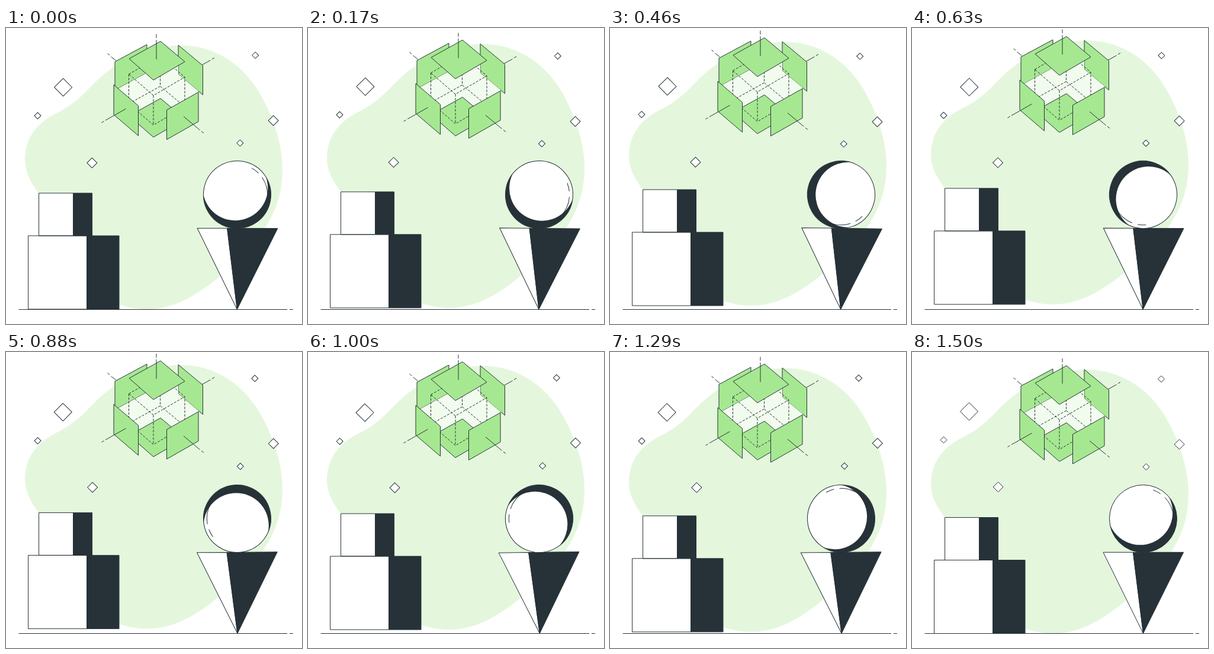
These frames come from a looping animation (500 by 500 pixels, 1540 ms). An HTML page:

```html
<!DOCTYPE html>
<html lang="en">
<head>
<meta charset="utf-8">
<title>Floating shapes</title>
<style>
  html, body { margin: 0; width: 100%; height: 100%; overflow: hidden; background: #fff; }
  svg { display: block; width: 100vw; height: 100vh; }
  .ink { stroke: #263238; stroke-width: 1; stroke-linejoin: round; }
  .dark { fill: #263238; }
  .white { fill: #fff; }
  .panel { fill: #a6e891; }
  .line { fill: none; }
  .dash { fill: none; stroke-dasharray: 4 2.3; }
</style>
</head>
<body>
<svg viewBox="0 0 500 500">
  <defs>
    <clipPath id="round"><circle cx="390.5" cy="281.5" r="57"/></clipPath>
  </defs>

  <path class="float" fill="#e4f7dd" d="M32 223C32 185 54 160 84 145C114 130 125 118 146 97C180 62 230 30 295 30C360 30 412 70 440 132C458 170 467 205 467 240C467 288 450 322 428 352C400 388 378 405 360 421C325 450 285 475.5 240 475.5C222 475.5 206 473 190 467C150 440 70 300 50 272C38 255 32 240 32 223Z"/>

  <path class="ink line" d="M21.5 475.5H475M479 475.5H485"/>

  <g id="diamonds" class="ink white"></g>

  <g class="float ink">
    <path class="line" d="M171.500 43.500l3.500 3M177.500 49l8 6.500M331 63l14.500-8M348 53.300l4-2.500"/>
    <path class="panel" d="M184 57.500L238 28.500V76L184 105.700Z"/>
    <path class="panel" d="M291 29.500L332.500 64V113.500L291 78.500Z"/>
    <path fill="#f1fbee" stroke="none" d="M188 103.500L238 76L249 88L291 64V78.500L325 107V109L271.500 139L261 119.500L223.500 141V132Z"/>
    <path class="panel" d="M261 119.500L302 154L249 185L208 149Z"/>
    <path class="dash" d="M207.500 78.500L260.500 48.500L302 83.500L249 114.500ZM207.500 78.500V128.500L249 164.500L302 133.500V83.500M249 114.500V164.500M260.500 48.500V99L207.500 128.500M260.500 99L302 133.500"/>
    <path class="panel" d="M261 23L302 57.500L249 88.500L208 52.500Z"/>
    <path class="panel" d="M182 96.500L223.500 132V182.500L182 147Z"/>
    <path class="panel" d="M325 109V158.500L271.500 189V139Z"/>
    <path class="line" d="M254 11V17.500M254 20.500V53.500M202.500 137L168 156.500M165.500 158L161.500 160.500M300 150L327.500 173M330 175L334 178"/>
  </g>

  <g class="float ink">
    <path class="white" d="M55.500 279.500H113.500V351.500H55.500ZM37.500 351.500H136.500V475.500H37.500Z"/>
    <path class="dark" d="M113.500 279.500H145.500V351.500H113.500ZM136.500 351.500H191V475.500H136.500Z"/>
  </g>

  <g id="cone" class="ink">
    <path class="white" d="M323 338.300H373.500L390.500 475.300Z"/>
    <path class="dark" d="M373.500 338.300H458.700L390.500 475.300Z"/>
  </g>

  <g id="ball">
    <circle class="dark" cx="390.500" cy="281.500" r="57"/>
    <g clip-path="url(#round)"><circle id="lit" class="white" r="55"/></g>
    <path id="shine" class="ink line"/>
    <circle class="ink line" cx="390.500" cy="281.500" r="57"/>
  </g>
</svg>
<script>
const LOOP = 1540, STEPS = 37;
const BALL = { x: 390.5, y: 281.5 };
const $ = id => document.getElementById(id);

// Point on a circle around the ball's centre, angle in degrees.
function polar(r, deg) {
  const a = deg * Math.PI / 180;
  return [BALL.x + r * Math.cos(a), BALL.y + r * Math.sin(a)];
}
const arc = (r, from, to) => `M${polar(r, from)}A${r} ${r} 0 0 1 ${polar(r, to)}`;

const [litX, litY] = polar(-11.8, 64.3);
$('lit').setAttribute('cx', litX);
$('lit').setAttribute('cy', litY);
$('shine').setAttribute('d', arc(51.2, -71, -55) + arc(51.2, -44.5, -3));

$('diamonds').innerHTML = [
  [96.5, 100.5, 15], [53.5, 148.5, 5.5], [145.5, 228, 8.5],
  [421, 45.7, 5.5], [451.7, 156, 8.5], [395.5, 194, 5.5]
].map(([x, y, r]) => `<path d="M${x} ${y - r}l${r} ${r}l${-r} ${r}l${-r} ${-r}Z"/>`).join('');

const floats = document.querySelectorAll('.float');
const move = (el, value) => el.setAttribute('transform', value);

// Sway of one degree: peak at a quarter, trough at three quarters.
const sway = p => p < .25 ? p * 4 : p < .75 ? 2 - p * 4 : p * 4 - 4;

function draw(now) {
  // 24 steps per second, each starting on a 10 ms tick.
  const step = Math.floor((Math.floor((now % LOOP) / 10) + .49) * .24);
  const p = (step + 1) % STEPS / STEPS;
  const lift = 10 * (1 - Math.abs(1 - 2 * p));
  floats.forEach(el => move(el, `translate(0 ${-lift})`));
  move($('diamonds'), `rotate(${sway(p)} 253 138.6)`);
  move($('cone'), `rotate(${sway(p)} 390.8 406.8)`);
  move($('ball'), `rotate(${360 * p} ${BALL.x} ${BALL.y})`);
}

const start = performance.now();
function tick() {
  draw(performance.now() - start);
  requestAnimationFrame(tick);
}
tick();
</script>
</body>
</html>
```
